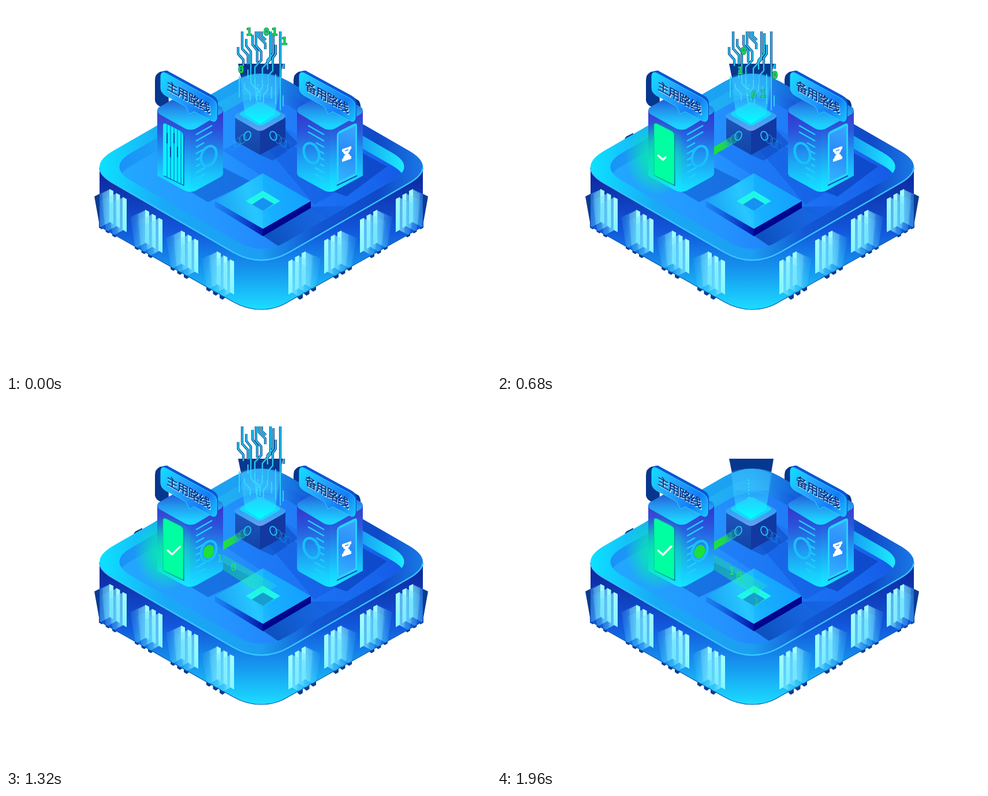
Animation, 840 px wide and 636 px high, one loop 2000 ms. Source, as an HTML page:

```html
<!DOCTYPE html>
<html lang="zh">
<head>
<meta charset="utf-8">
<title>主用路线 / 备用路线</title>
<style>
html, body { margin: 0; width: 100%; height: 100%; overflow: hidden; background: #fff; }
svg { display: block; width: 840px; height: 636px; }
.digit { font: 17px "DejaVu Sans Mono", monospace; text-anchor: middle; fill: #20f050; }
.falling { font-weight: bold; fill: #18e050; stroke: #0a6c6c; stroke-width: 1.6px; paint-order: stroke; }
.sign { font: 20px "Noto Sans CJK SC", "Noto Sans CJK", sans-serif; text-anchor: middle; }
</style>
</head>
<body>
<svg id="stage" viewBox="0 0 840 636"></svg>
<script>
const LOOP = 2000, STEP = 40;
const stage = document.getElementById('stage');

const path = (d, fill, extra = '') => `<path d="${d}" fill="${fill}" ${extra}/>`;
const line = (d, color, width, extra = '') =>
  path(d, 'none', `stroke="${color}" stroke-width="${width}" stroke-linejoin="round" ${extra}`);
const stops = list => list.map(([o, c, a = 1]) =>
  `<stop offset="${o}" stop-color="${c}" stop-opacity="${a}"/>`).join('');
const gradient = (id, x1, y1, x2, y2, list) =>
  `<linearGradient id="${id}" gradientUnits="userSpaceOnUse" x1="${x1}" y1="${y1}" x2="${x2}" y2="${y2}">${stops(list)}</linearGradient>`;

// Isometric diamond with rounded corners
function diamond(cx, cy, w, k = .158) {
  const h = w * .577;
  const corners = [[cx - w, cy], [cx, cy - h], [cx + w, cy], [cx, cy + h]];
  const mix = (a, b) => a.map((v, i) => v + (b[i] - v) * k);
  return corners.map((c, i) => {
    const from = mix(c, corners[(i + 3) % 4]), to = mix(c, corners[(i + 1) % 4]);
    return `${i ? 'L' : 'M'}${from} Q${c} ${to}`;
  }).join(' ') + 'Z';
}

const rim = diamond(442, 278.5, 304);
const opening = diamond(443, 278.5, 268);
const wall = 'M162 278V382L392 512Q416 526 442 526T490 512L722 382V278Z';
const body = 'M262 180V294L306 318Q319 326 332 318L372 296Q376 293 376 289V181Z';
const roof = 'M264 176L306 152Q319 146 332 152L374 176Q378 181 373 186L333 210Q320 219 306 210L265 187Q260 181 264 176Z';
const door = 'M272 207Q272 202 277 204L301 216Q307 219 307 225V310L272 293Z';
const tower = body + roof;

const defs = `<defs>
${gradient('wallFill', 0, 300, 0, 525, [[0, '#0e2ba2'], [.4, '#1257dc'], [.72, '#169af0'], [1, '#1cdcff']])}
${gradient('rimFill', 162, 0, 722, 0, [[0, '#0ce2ff'], [.2, '#1aa9f6'], [.5, '#1c9ef2'], [.66, '#1358d4'], [.86, '#0f49c8'], [1, '#1a78e6']])}
${gradient('innerFill', 196, 0, 690, 0, [[0, '#1a92f8'], [.35, '#20b0f4'], [.5, '#23a4f3'], [.65, '#1557db'], [.84, '#169cf2'], [1, '#1cecff']])}
${gradient('floorFill', 200, 300, 690, 250, [[0, '#22a8ff'], [.35, '#2494ff'], [.65, '#1f7af6'], [1, '#1458e6']])}
${gradient('bodyFill', 0, 180, 0, 320, [[0, '#3e3acc'], [.25, '#2a59dd'], [.55, '#1f9cf3'], [.85, '#16d4ff'], [1, '#12e8ff']])}
${gradient('sideFill', 330, 320, 376, 185, [[0, '#18c8ff', .2], [.4, '#2266e6', .12], [1, '#2f2ccc', .45]])}
${gradient('roofFill', 0, 155, 0, 215, [[0, '#214bd2'], [.45, '#2396ee'], [.85, '#1cd0ff'], [1, '#18d8ff']])}
${gradient('signFill', 268, 120, 365, 195, [[0, '#12dcff'], [.35, '#26a7ff'], [.75, '#147cf6'], [1, '#18c0ff']])}
${gradient('cubeFill', 0, 195, 0, 258, [[0, '#1d55bd'], [1, '#1244a6']])}
${gradient('cubeTop', 0, 165, 0, 216, [[0, '#2a90ee'], [.6, '#38a4f4'], [1, '#6a9cec']])}
${gradient('beamFill', 0, 110, 0, 200, [[0, '#45c5ff', .15], [.6, '#35c8ff', .5], [1, '#0ff', .95]])}
${gradient('paneFill', 275, 210, 304, 300, [[0, '#3aa4ff'], [.5, '#2a8cf8'], [1, '#30b4ff']])}
${gradient('slabFill', 362, 360, 520, 310, [[0, '#1388ee'], [.4, '#22c0ff'], [.55, '#17b0ff'], [1, '#149eff']])}
${gradient('slabLeft', 362, 0, 445, 0, [[0, '#0c58dc', .3], [1, '#0212a8']])}
${gradient('shadeFill', 460, 400, 590, 340, [[0, '#073fac', .75], [1, '#1058d8', .3]])}
${gradient('linkFill', 376, 250, 422, 224, [[0, '#20e23a'], [.35, '#1fda48', .95], [.6, '#1ccc70', .45], [1, '#18c890', .08]])}
${gradient('laneFill', 376, 278, 460, 330, [[0, '#19e090', .4], [.6, '#1df0a0', .45], [1, '#1fffc0', .2]])}
${gradient('finFill', -27, 0, 0, 0, [[0, '#3cc4ff', .1], [1, '#7ce8ff', .6]])}
${gradient('barFill', 0, 0, 0, 58, [[0, '#a4ffff'], [1, '#84f6ff']])}
<radialGradient id="glowFill">${stops([[0, '#00ff9c', .8], [.5, '#0f9', .5], [1, '#0f9', 0]])}</radialGradient>
<clipPath id="inOpening"><path d="${opening}"/></clipPath>
<clipPath id="inWall"><path d="${wall}"/></clipPath>
<clipPath id="inScene"><path d="${rim}"/><path d="${tower}"/></clipPath>
<clipPath id="inDoor"><path d="${door}"/></clipPath>
</defs>`;

const traces = `M402 71V83L411 93V104 M409 44V74L419 85V101 M416 57V69L424 79V110 M427 50V67L435 77V98
  M433 44V69L442 79V94L431 106V124 M438 44V54L449 65V75 M443 44V52L450 59 M458 44V92L444 108V128
  M463 47V82L453 94V110 M467 67V83L462 90V112L454 121V136 M475 44V124 M481 100V109`;
const lowTraces = `M404 122V158 M413 134V142L423 152V164 M419 110V126 M424 110V134L433 144V160 M431 124V139L440 149V164
  M444 128V142L434 153V166 M453 136V146L446 154V168 M460 140V160 M467 118V170 M475 124V181 M480 155V174`;

// Fins on the left wall; the right wall mirrors them
const bars = [];
for (let g = 0; g < 4; g++)
  for (let i = 0; i < 3; i++) bars.push([179 + g * 62 + i * 11.5, 317 + g * 36 + i * 7]);
const place = (list, content) =>
  list.map(([x, y]) => `<g transform="translate(${x} ${y})">${content}</g>`).join('');
const mirror = (content, axis) => content + `<g transform="translate(${axis * 2}) scale(-1 1)">${content}</g>`;
const tabs = place(bars, path('M-18 58L-9 63V67L-13 70L-18 67Z', '#0a3c90'))
  + path('M153 330L163 325V386Z', '#0a3c90');
const fins = place(bars,
  path('M0 1L-26 13L-17 67L0 58Z', 'url(#finFill)') +
  path('M0 2L-12 8L-8 62L0 58Z', '#8ff0ff', 'opacity=".25"') +
  path('M0 0L7 3.500V61L0 57Z', 'url(#barFill)'));
const signBack = 'M280 112L267 114Q258 118 258 128V164Q260 173 270 175L282 170Z'
  + 'M358 156L371 164Q375 170 374 178H358Z';

const platform =
  mirror(tabs, 442) +
  path(signBack, '#07368e') + path(signBack, '#07368e', 'transform="translate(240)"') +
  path('M402 100H479L474 130H408Z', '#06388f') +
  line(traces, '#0a4f90', 4.2, 'id="casing"') +
  path('M221 230L224 226L236 220V230Z', '#0b3d80', 'id="speck"') +
  path(wall, 'url(#wallFill)') +
  line('M162 382L392 512Q416 526 442 526T490 512L722 382', '#0c5cb4', 1.2) +
  mirror(`<g clip-path="url(#inWall)">${fins}</g>`, 442) +
  path(rim, 'url(#rimFill)') +
  line('M162 280Q163 294 186 307L394 427Q442 454 490 427L698 307Q721 294 722 280', '#35c6ff', 2.5) +
  `<g clip-path="url(#inOpening)">
    ${path(opening, 'url(#innerFill)')}
    ${path(diamond(443, 301, 268), 'url(#floorFill)')}
    ${path('M375 250L465 200L690 330L590 390Z', '#1768ee', 'opacity=".4"')}
    ${path('M455 250L483 234L604 304L534 344Z', '#1259dd', 'opacity=".5"')}
    ${path('M470 415L445 398L528 348L595 346L510 440Z', 'url(#shadeFill)')}
    ${path('M320 322L376 280L424 304L350 340Z', '#1060d4', 'opacity=".65"')}
    ${path('M568 322L618 255L660 278L590 330Z', '#0a3ebc', 'opacity=".65"')}
    ${path('M440 258L484 215L506 238L462 268Z', '#0f48be', 'opacity=".55"')}
  </g>`;

const slab =
  path('M362 338L445 386V399L362 348Z', 'url(#slabLeft)') +
  path('M445 386L528 338V350L445 399Z', '#02058e') +
  path('M445 290L528 338L445 386L362 338Z', 'url(#slabFill)') +
  path('M445 290V320L415 338L445 355V386L362 338Z', '#35dcff', 'opacity=".25"') +
  path('M445 320L475 338L445 355L415 338Z', '#20f6e8') +
  path('M445 332L464 343L445 355L426 344Z', '#1692f2');

let stripes = '', vents = '';
for (let x = 279; x < 306; x += 6) stripes += line(`M${x} 200V312`, '#0b7cd0', 1.3);
for (let i = 0; i < 4; i++) stripes += line(`M${279 + i * 6} ${220 + i % 2 * 24}v18`, '#1038b8', 2);
for (let i = 0; i < 8; i++) {
  const y = 223 + i * 11, w = i < 2 ? 28 : i < 4 ? 14 : i < 6 ? 7 : 16;
  vents += line(`M329 ${y}l${w} ${-w * .57}`, '#20d0fc', 2.4);
}
const ring = '<ellipse cx="351" cy="260" rx="12.5" ry="18" transform="rotate(22 351 260)" fill="none" stroke="#18c0fa" stroke-width="4.4"/>';
const shell = path(body, 'url(#bodyFill)') +
  path('M319 200L376 181V289Q376 293 372 296L332 318Q326 322 319 322Z', 'url(#sideFill)') +
  path(roof, 'url(#roofFill)') + vents;

const sign = (dx, label) => {
  const chars = [...label].map((c, i) => `<text class="sign" x="${-28 + i * 18.7}" y="7">${c}</text>`).join('');
  return `<g transform="translate(${dx})">
    ${path('M268 118Q270 111 279 112L358 155Q367 160 367 168V195Q367 202 361 202L350 190L272 140Z', '#0c56d4')}
    ${path('M268 121Q269 112 278 117L356 160Q365 165 365 173V194Q364 203 356 199L326 183L318 187L311 174L276 155Q268 150 268 142Z', 'url(#signFill)', 'stroke="#24d2ff"')}
    <g transform="matrix(1 .56 0 1 316 158)">
      <g fill="#d8f0ff" transform="translate(1.3 1.3)">${chars}</g>
      <g fill="#0b2f78" stroke="#0b2f78" stroke-width=".4">${chars}</g>
    </g>
  </g>`;
};

const leftTower = shell + path(door, '#0b48bc', 'transform="translate(1.5 2)"') + path(door, '#0af0ff') +
  `<g clip-path="url(#inDoor)">${stripes}</g>` + ring;
const rightTower = `<g transform="translate(880) scale(-1 1)">
    ${shell}${path(door, '#1040b4', 'transform="translate(0 2)"')}${path(door, '#24d4ff')}
    ${path('M275 208L304 222V304L275 290Z', 'url(#paneFill)')}${ring.replaceAll('260', '255')}
  </g>` +
  path('M-8 -11H8V-6H6Q6 -2 2 0Q6 2 6 6H8V11H-8V6H-6Q-6 2 -2 0Q-6 -2 -6 -6H-8Z', '#fff', 'transform="matrix(1 -.35 0 1 590 256.500)"') +
  line('M587 251L593 249', '#3f8cf0', 1.5);

const smallRings = [0, 1, 2, 3].map(i => {
  const x = 418 - i * 8.4, y = 225 + i * 5.7;
  return `<ellipse cx="${x}" cy="${y}" rx="5.5" ry="8" transform="rotate(22 ${x} ${y})" fill="none" stroke="#1fc6f2" stroke-width="1.8" opacity="${i ? .5 - i * .11 : 1}"/>`;
}).join('');
const cube =
  path('M397 190L440 213V258L401 236Q397 234 397 230Z', 'url(#cubeFill)') +
  path('M440 213L484 190V230Q484 234 480 236L440 258Z', '#1238a2') +
  path(diamond(440, 191, 48), 'url(#cubeTop)') +
  path(diamond(440, 187, 38), '#12e0ff', 'opacity=".85"') +
  path('M404 122Q440 112 477 122L466 188L440 204L414 188Z', 'url(#beamFill)') +
  path('M407 126Q440 110 474 126L470 155H411Z', '#48c8ff', 'opacity=".3"') +
  line('M436 136V168', '#28f0ff', 1.8, 'stroke-dasharray="2 4"');

const circuit = `<g id="circuit">${line(traces, '#2cc6f2', 2)}
  ${line(lowTraces, '#35dcff', 2, 'opacity=".85"')}</g>`;

// Digits in the fountain: glyph and [time, x, y, opacity] keys
const falling = [
  ['1', [[0, 421, 51, 1], [200, 421, 79, 1], [480, 428, 104, 1], [680, 421, 118, 1], [920, 421, 138, 0]]],
  ['0', [[0, 451, 51, 1], [200, 449, 98, 1], [480, 435, 139, .9], [680, 445, 160, .6], [800, 445, 172, 0]]],
  ['1', [[0, 465, 51, 1], [200, 463, 107, 1], [480, 453, 141, .9], [680, 437, 160, .25], [760, 437, 168, 0]]],
  ['1', [[0, 482, 67, 1], [200, 482, 104, 1], [480, 473, 137, .9], [680, 461, 158, .6], [800, 458, 170, 0]]],
  ['0', [[0, 407, 116, 1], [200, 408, 158, .6], [280, 408, 174, 0]]],
  ['0', [[320, 420, 50, 1], [480, 420, 72, 1], [680, 427, 84, 1], [1080, 423, 132, .3], [1160, 423, 140, 0]]],
  ['0', [[260, 481, 54, 1], [480, 481, 92, 1], [680, 481, 126, 1], [960, 478, 172, 0]]]
];
const sliding = [['0', 1080], ['1', 1215], ['0', 1376], ['1', 1465], ['0', 1582], ['1', 1654]];
const digits = [...falling, ...sliding].map(([c], i) =>
  `<text class="digit ${i < falling.length ? 'falling' : ''}" id="d${i}">${c}</text>`).join('');

stage.innerHTML = defs + platform + slab +
  path('M376 266L470 320L445 336L376 293Z', 'url(#laneFill)', 'id="lane"') +
  path('M445 332L464 343L445 355L426 344Z', '#18a0c8', 'id="hole"') +
  cube + mirror(smallRings, 440.5) +
  path('', 'url(#linkFill)', 'id="link"') + leftTower + rightTower +
  `<g id="green">
    <ellipse cx="278" cy="264" rx="56" ry="64" fill="url(#glowFill)" clip-path="url(#inScene)"/>
    ${path(door, '#00ffa0', 'stroke="#10b8a0" stroke-width=".8"')}
  </g>
  <ellipse id="lamp" cx="351" cy="261" rx="9" ry="12" transform="rotate(22 351 261)" fill="#1de038"/>
  <g id="check">${line('M279 259L287.500 266.500L302 252', '#fff', 3.4, 'id="tick" pathLength="100" stroke-linecap="round"')}</g>` +
  sign(0, '主用路线') + sign(240, '备用路线') + circuit + digits;

const el = id => document.getElementById(id);
const ramp = (t, a, b) => Math.max(0, Math.min(1, (t - a) / (b - a)));

function sample(keys, t) {
  if (t < keys[0][0] || t >= keys.at(-1)[0]) return [0, 0, 0];
  const i = keys.findIndex(k => k[0] > t);
  const [from, to] = [keys[i - 1], keys[i]];
  const p = ramp(t, from[0], to[0]);
  return [1, 2, 3].map(n => from[n] + (to[n] - from[n]) * p);
}

function slide(start, t) {
  if (t < start) return [0, 0, 0];
  const x = 351 + .18 * (t - start);
  const drop = Math.max(0, x - 446);
  const fade = 1 - .55 * ramp(x, 418, 435) - .45 * ramp(x, 485, 500);
  return [Math.min(x, 449), 268 + (Math.min(x, 446) - 351) * .6 + drop * .75, fade];
}

function render(t) {
  const show = (id, value) => el(id).setAttribute('opacity', value);
  show('green', ramp(t, 0, 160));
  show('speck', t >= 80 ? 1 : 0);
  show('lane', ramp(t, 840, 1040));
  show('hole', ramp(t, 920, 1080) * .8);
  show('lamp', ramp(t, 760, 960));
  show('circuit', t < 1600 ? 1 : 0);
  show('casing', t < 1600 ? 1 : 0);

  const reach = ramp(t, 240, 440), dx = -46 * reach, dy = 27 * reach;
  el('link').setAttribute('d', `M422 217V231L${422 + dx} ${231 + dy}V${217 + dy}Z`);
  show('link', reach ? 1 : 0);

  const drawn = ramp(t, 460, 860) * 100;
  const size = 1 - .3 * ramp(t, 860, 1080) + .3 * ramp(t, 1080, 1400);
  show('check', t >= 460 ? 1 : 0);
  el('tick').setAttribute('stroke-dasharray', `${Math.max(drawn, .5)} 200`);
  el('check').setAttribute('transform', `translate(291 259) scale(${size}) translate(-291 -259)`);

  [...falling.map(d => sample(d[1], t)), ...sliding.map(d => slide(d[1], t))].forEach(([x, y, a], i) => {
    const node = el('d' + i);
    node.setAttribute('x', x);
    node.setAttribute('y', y);
    node.setAttribute('opacity', a);
  });
}

const origin = performance.now();
function tick() {
  const t = (performance.now() - origin) % LOOP;
  render(Math.floor(t / STEP) * STEP);
  requestAnimationFrame(tick);
}
tick();
</script>
</body>
</html>
```
